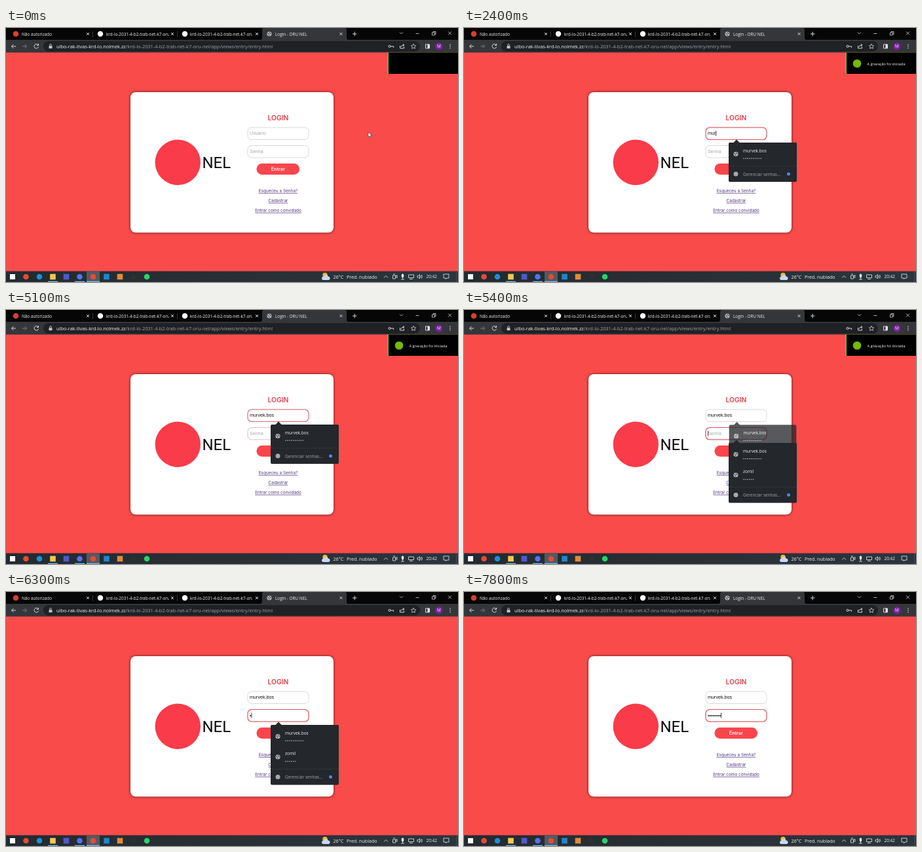
Animation, 690 px wide and 388 px high, one loop 8000 ms. Source, as an HTML page:

```html
<!DOCTYPE html>
<html lang="pt">
<head>
<meta charset="utf-8">
<title>Login</title>
<style>
  html, body { margin: 0; width: 100%; height: 100%; overflow: hidden; background: #fa4b4b }
  svg { display: block; width: 100vw; height: 100vh }
  text { white-space: pre }
  .ui { font: 6.4px "Open Sans", "Noto Sans", sans-serif; fill: #f1f2f4 }
  .url { font-size: 7.4px; fill: #9aa0a6 }
  .page { font-family: Inter, sans-serif; text-anchor: middle }
  .input { font: 7.2px "Liberation Sans", Arial, sans-serif; fill: #111 }
  .hint { fill: #a9a9a9 }
  .link { font-size: 6.45px; fill: #51307c; text-decoration: underline; text-decoration-thickness: .5px }
  .line { fill: none; stroke: #d5d7da; stroke-width: 1 }
  .popup { transform-box: fill-box; transform-origin: center; filter: drop-shadow(0 .5px .7px #0005) }
  .card { filter: drop-shadow(0 .5px 2px #000a) }
</style>
</head>
<body>
<svg viewBox="0 0 690 388">
  <defs>
    <g id="globe">
      <circle r="3.6" fill="#b4b8bd"/>
      <path d="M-2.8-1.2L-.6.3 0 2.6M.2-2.8L1-.8 2.8 0" fill="none" stroke="#33363a" stroke-width="1"/>
    </g>
    <path id="close" class="line" d="M-1.9-1.9L1.9 1.9M1.9-1.9L-1.9 1.9"/>
    <clipPath id="tabA"><rect x="153" width="96" height="18"/></clipPath>
    <clipPath id="tabB"><rect x="281" width="95" height="18"/></clipPath>
    <clipPath id="toastArea"><rect x="582" y="37.500" width="108" height="32.500"/></clipPath>
    <linearGradient id="bar">
      <stop stop-color="#222b31"/><stop offset=".5" stop-color="#2a2f35"/><stop offset="1" stop-color="#2a353e"/>
    </linearGradient>
  </defs>

  <rect width="690" height="388" fill="#fa4b4b"/>

  <!-- browser frame -->
  <g class="ui">
    <rect width="690" height="18" fill="#060606"/>
    <path d="M388 18q3 0 3-3V3q0-3 3-3h123q3 0 3 3v12q0 3 3 3z" fill="#35363a"/>
    <rect y="18" width="690" height="19.500" fill="#35363a"/>
    <rect x="57" y="20" width="575" height="16" rx="8" fill="#202124"/>
    <circle cx="15" cy="9" r="4.300" fill="#d8402f"/>
    <circle cx="144" cy="9" r="4.200" fill="#fff"/>
    <circle cx="273" cy="9" r="4.200" fill="#fff"/>
    <use href="#globe" x="402" y="9"/>
    <text x="24" y="11.500">Não autorizado</text>
    <text x="153" y="11.500" clip-path="url(#tabA)">krd-lo-2031-4-b2-trab-net-k7-oru</text>
    <text x="281" y="11.500" clip-path="url(#tabB)">krd-lo-2031-4-b2-trab-net-k7-oru</text>
    <text x="411" y="11.500">Login - ORU NEL</text>
    <use href="#close" x="125" y="9"/><use href="#close" x="254" y="9"/>
    <use href="#close" x="383" y="9"/><use href="#close" x="511.500" y="9"/>
    <path d="M132.500 5v9M261.500 5v9" stroke="#4a4c50" stroke-width=".7"/>
    <path class="line" d="M529 9h6.500M532.200 5.800v6.500"/>
    <path class="line" style="stroke-width:.8" d="M601 6.500l2.500 2.500 2.500-2.500M625.500 8.500h5M650.500 7h4v4h-4zM652 7V5.500h4v4h-1.500M675 5.500l5 5M680 5.500l-5 5"/>
    <path class="line" d="M15 28H8.500M11.500 25l-3 3 3 3M48.700 25.500a3.300 3.300 0 1 0 .8 3.300M49.500 24v2.500H47"/>
    <path class="line" style="stroke:#777a7e" d="M25 28h6.500M28.500 25l3 3-3 3"/>
    <path d="M65.500 27.200h5v4h-5z" fill="#c4c7cb"/>
    <path class="line" style="stroke-width:.8" d="M66.700 27v-1.200a1.300 1.300 0 0 1 2.600 0V27"/>
    <text class="url" x="77" y="30.700"><tspan fill="#f1f3f4">ulbo-rak-tivas-krd-lo.nolmek.zz</tspan>/krd-lo-2031-4-b2-trab-net-k7-oru-nel/app/views/entry/entry.html</text>
    <circle class="line" cx="585.500" cy="28" r="1.600"/>
    <path class="line" d="M587 28h4.500v2M601.500 27v4h6v-2.500M603 29q.5-3 4.500-3M606 24.300l2 1.700-2 1.700"/>
    <path class="line" style="stroke-width:.8" d="M622 24.300l1.100 2.400 2.600.3-1.900 1.800.5 2.600-2.300-1.300-2.300 1.300.5-2.600-1.900-1.800 2.600-.3z"/>
    <path class="line" d="M640.500 25h6v6h-6z"/><path d="M643.500 25h3v6h-3z" fill="#e4e6e9"/>
    <circle cx="661" cy="28" r="5.600" fill="#7b1fa2"/>
    <text x="661" y="30.300" text-anchor="middle">M</text>
    <g fill="#d5d7da"><circle cx="678" cy="25.300" r=".8"/><circle cx="678" cy="28" r=".8"/><circle cx="678" cy="30.700" r=".8"/></g>
  </g>

  <!-- login card -->
  <rect class="card" x="190" y="98" width="310" height="214.500" rx="8" fill="#fff"/>
  <circle cx="262.300" cy="205.300" r="34.700" fill="#fa3b4a"/>
  <text x="299.500" y="214" font-family="Roboto, sans-serif" font-size="24" fill="#0b0b0b">NEL</text>
  <text class="page" x="415.500" y="141.300" font-size="10.300" font-weight="600" fill="#e5404b">LOGIN</text>
  <g id="fields"></g>
  <rect x="382.500" y="207" width="65.500" height="17" rx="8.500" fill="#fb454c" style="filter:drop-shadow(0 .3px .6px #0003)"/>
  <text class="page" x="415.300" y="218.200" font-size="7.200" font-weight="600" fill="#fff">Entrar</text>
  <g class="page">
    <text class="link" x="415.500" y="251">Esqueceu a Senha?</text>
    <text class="link" x="415.500" y="266">Cadastrar</text>
    <text class="link" x="415.500" y="281.200">Entrar como convidado</text>
  </g>
  <g id="popups"></g>

  <!-- recorder notice -->
  <g clip-path="url(#toastArea)">
    <rect id="slab" x="582" y="37" width="108" height="33" fill="#76b900"/>
    <g id="notice">
      <rect x="584" y="37" width="106" height="33"/>
      <g id="message">
        <circle cx="600" cy="54.200" r="6.300" fill="#76b900"/>
        <text class="ui" x="615.500" y="56.500" style="font-size:5.600px;fill:#fff">A gravação foi iniciada</text>
      </g>
    </g>
  </g>

  <!-- taskbar -->
  <rect y="371.500" width="690" height="17" fill="url(#bar)"/>
  <rect x="123" y="371.500" width="20" height="17" fill="#525a60"/>
  <g id="apps"></g>
  <path d="M64 387.300h15M105 387.300h15M123 387.300h20" stroke="#76b9ed" stroke-width="1.200"/>
  <g class="ui">
    <circle cx="487" cy="377.500" r="3.700" fill="#f7b52c"/>
    <path d="M484.500 385a2.600 2.600 0 0 1 .3-5.200 3.700 3.700 0 0 1 7-.4 2.900 2.900 0 0 1 1 5.600z" fill="#c5d9f2"/>
    <text x="499.500" y="382.600" style="font-size:7.200px">26°C</text>
    <text x="520" y="382.600" style="font-size:7.100px">Pred. nublado</text>
    <path class="line" style="stroke-width:.9" d="M577 381.500l3-3 3 3M590.500 378h4v5h-4zM594.500 379l2.500-1.500v4l-2.500-1.500M591 376h3M614.500 377h8v4.500h-8zM616 383.500h5M628 378.500h1.500l2-2v6.500l-2-2H628zM633 378q1.200 1.700 0 3.500M634.500 377q2 2.700 0 5.500M668 376h8v6h-3l-1.500 1.500V382H668z"/>
    <rect x="603.800" y="375.500" width="3.400" height="6" rx="1.700" fill="#eee"/>
    <path d="M605.500 381v3M603 384h5" stroke="#eee" stroke-width=".8"/>
    <text x="641.500" y="382.300">20:42</text>
    <path d="M687.500 372v16" stroke="#5a6066" stroke-width=".6"/>
  </g>

  <g id="pointer">
    <path id="arrow" d="M0 0v7.500l1.800-1.600 1.200 2.700 1.300-.6-1.200-2.600h2.300z" fill="#fff" stroke="#222" stroke-width=".6"/>
    <path id="beam" d="M-1.300-3.500h2.600M0-3.500v7M-1.300 3.500h2.600" stroke="#222" stroke-width=".7" fill="none"/>
  </g>
</svg>

<script>
const $ = id => document.getElementById(id);
const LOOP = 8000;
const USER = "murvek.bos";
const ramp = (t, from, to) => Math.min(1, Math.max(0, (t - from) / (to - from)));
const between = (t, from, to) => t >= from && t < to;

const fields = [
  { y: 152, hint: "Usuário", value: n => USER.slice(0, n), focus: 600, blur: 5320,
    glow: t => ramp(t, 500, 700) * (1 - ramp(t, 5050, 5350)),
    keys: [1900, 2200, 2400, 2600, 2800, 3000, 3200, 3500, 4000, 4200] },
  { y: 179.5, hint: "Senha", value: n => "•".repeat(n), focus: 5320, blur: LOOP,
    glow: t => ramp(t, 5050, 5350),
    keys: [6300, 6500, 6800, 7000, 7200, 7300, 7500, 7800] }
];

$("fields").innerHTML = fields.map(({ y }) => {
  const box = `x="369" y="${y}" width="93" height="18.500" rx="6"`;
  return `<g><rect ${box} fill="#fff" stroke="#d0d0d0" stroke-width=".8"/>
    <rect ${box} fill="none" stroke="#e0525a" stroke-width="1.100"/>
    <text class="input" x="372" y="${y + 11.3}"></text>
    <rect y="${y + 5}" width=".8" height="8" fill="#111"/></g>`;
}).join("");

fields.forEach((field, i) => {
  [, field.ring, field.text, field.caret] = $("fields").children[i].children;
});

// Saved logins: [name, number of password dots]
const saved = [[USER, 10], ["zomil", 6]];
const popups = [
  { y: 175, rows: saved, from: 580, to: 1900, hard: true },
  { y: 175, rows: saved.slice(0, 1), from: 1900, to: 5350, instant: true },
  { y: 203, rows: saved, from: 5200, to: 6300 }
];

function popupMarkup({ y, rows }) {
  const end = y + 36 + (rows.length - 1) * 31.5;
  const entries = rows.map(([name, dots], i) => {
    const top = y + i * 31.5;
    return `<use href="#globe" x="415" y="${top + 17.5}"/>
      <text x="426" y="${top + 14.6}" style="font-size:6.500px">${name}</text>
      <path d="M427 ${top + 24.3}h${(dots - 1) * 2.9 + 0.1}" stroke="#c3c6ca" stroke-width="1.600"
        stroke-linecap="round" stroke-dasharray="0 2.900"/>`;
  }).join("");
  return `<g class="popup ui">
    <path d="M411 ${y + .5}l5-5 5 5z" fill="#24272b"/>
    <rect x="404" y="${y}" width="104" height="${end - y + 24}" rx="2" fill="#24272b"/>
    ${entries}
    <path d="M404 ${end}h104" stroke="#383c41" stroke-width=".7"/>
    <circle cx="415" cy="${end + 12}" r="3.500" fill="#a5a9ae"/>
    <text x="426" y="${end + 14.5}" style="font-size:6.450px;fill:#a0a5ab">Gerenciar senhas...</text>
    <circle cx="495.500" cy="${end + 12}" r="2.500" fill="#4d86ee"/></g>`;
}
$("popups").innerHTML = popups.map(popupMarkup).join("");

const apps = [["#fff", 1], ["#e64a36"], ["#1d8fd6"], ["#f5c84c", 1], ["#5059c9", 1], ["#5b6ef0"],
  ["#e64a36"], ["#1c86d1", 1], ["#e08a3c", 1], ["#30302c"], ["#2bd366"]];
$("apps").innerHTML = apps.map(([color, square], i) => {
  const r = i ? 4.3 : 4;
  return `<rect x="${10 + i * 20.5 - r}" y="${380 - r}" width="${2 * r}" height="${2 * r}" rx="${square ? 0 : r}" fill="${color}"/>`;
}).join("");

function drawField(field, t) {
  const { keys, focus, blur, text, caret } = field;
  const typed = keys.filter(k => k <= t).length;
  const value = field.value(typed);
  text.textContent = value || field.hint;
  text.classList.toggle("hint", !value);
  field.ring.setAttribute("opacity", field.glow(t));
  const since = t - (typed ? keys[typed - 1] : focus);
  const lit = between(t, focus, blur) && since % 1000 < 500;
  caret.setAttribute("opacity", +lit);
  caret.setAttribute("x", 372 + (value ? text.getComputedTextLength() : 0));
}

function drawPopup({ from, to, instant, hard }, i, t) {
  const shrink = hard ? +(t >= to) : ramp(t, to, to + 215);
  const shown = instant ? +(t >= from) : ramp(t, from, from + 120);
  const el = $("popups").children[i];
  el.style.opacity = shown * (1 - shrink);
  el.style.transform = `scale(${1 - 0.06 * shrink})`;
}

function drawNotice(t) {
  $("message").setAttribute("opacity", ramp(t, 60, 400));
  $("notice").setAttribute("transform", `translate(${106 * ramp(t, 5550, 5780)})`);
  $("slab").setAttribute("x", 582 + 108 * ramp(t, 5750, 6050));
}

function drawPointer(t) {
  const p = ramp(t, 60, 500), ease = p * p * (3 - 2 * p);
  const x = 553 - 133 * ease;
  $("pointer").setAttribute("transform", `translate(${x} ${159 + 2 * ease})`);
  $("pointer").setAttribute("opacity", +(t < 1900));
  $("arrow").setAttribute("opacity", +(x > 462));
  $("beam").setAttribute("opacity", +(x <= 462));
}

function frame(now) {
  const t = now % LOOP;
  fields.forEach(f => drawField(f, t));
  popups.forEach((p, i) => drawPopup(p, i, t));
  drawNotice(t);
  drawPointer(t);
  requestAnimationFrame(frame);
}
frame(0);
</script>
</body>
</html>
```
